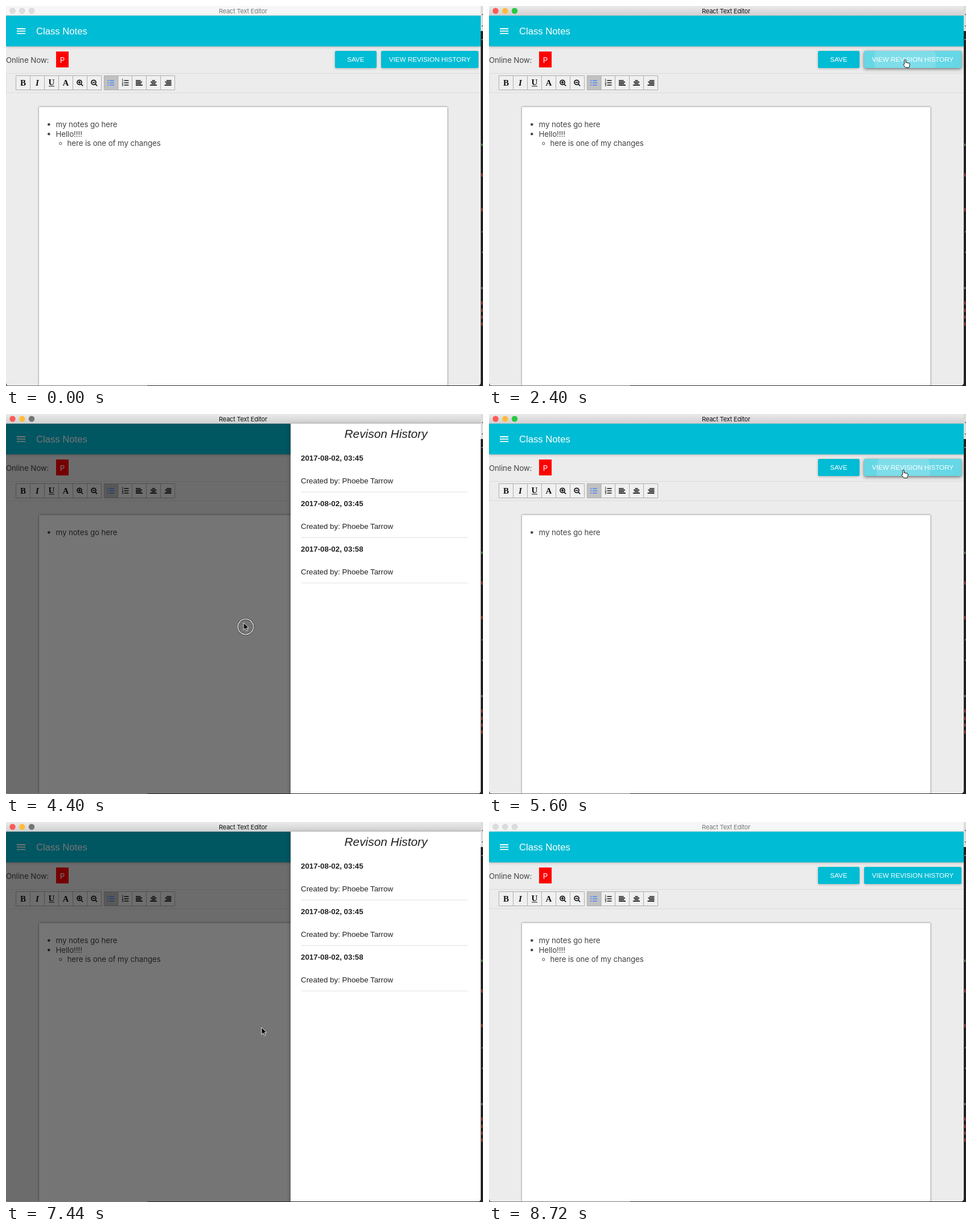
Animation, 838 px wide and 668 px high, one loop 8800 ms. Source, as an HTML page:

```html
<!DOCTYPE html>
<html lang="en">
<head>
<meta charset="utf-8">
<title>React Text Editor</title>
<style>
  html, body { margin: 0; width: 100%; height: 100%; overflow: hidden; background: #222; }
  svg { display: block; }
  text { white-space: pre; }
  .ui { font: 13.33px Inter, sans-serif; letter-spacing: -.1px; fill: #444; }
  .title { font: 11px Inter, sans-serif; letter-spacing: -.2px; text-anchor: middle; }
  .arial { font-family: "Liberation Sans", Arial, sans-serif; }
  .btn { font-size: 11.67px; fill: #fff; text-anchor: middle; }
  .tool { font: bold 15px "Liberation Serif", serif; text-anchor: middle; fill: #111; }
  .digits { font: bold 4.6px "Liberation Sans", sans-serif; fill: #111; }
  .row { font-size: 13.33px; fill: #212121; }
  .row .date { font-weight: bold; }
  .raised { filter: drop-shadow(0 1px 2px rgba(0,0,0,.25)); }
  .raised-more { filter: drop-shadow(0 2px 3px rgba(0,0,0,.4)); }
  .sheet { filter: drop-shadow(0 0 1.5px rgba(0,0,0,.6)); }
  .panel { filter: drop-shadow(0 3px 5px rgba(0,0,0,.3)); }

  /* One loop is 8800 ms, so 1% is 88 ms. */
  .loop { animation: 8800ms linear infinite; }
  .step { animation: 8800ms step-end infinite; }
  #active { animation-name: active; }
  #zoom { animation-name: zoom; }
  #more { animation-name: more; }
  #hover { animation-name: hover; }
  #ripple { animation-name: ripple; }
  #dim { animation-name: dim; }
  #drawer { animation-name: drawer; }
  #row1 { animation-name: row1; }
  #row2 { animation-name: row2; }
  #row3 { animation-name: row3; }
  #cursor { animation-name: move; }
  #arrow { animation-name: arrow; }
  #hand { animation-name: hand; }
  #ring { animation-name: ring; }

  @keyframes active { 0%, 99% { opacity: 0 } 17.2% { opacity: 1 } }
  @keyframes zoom { 0%, 52.7%, 87.2% { fill: #28c940 } 29%, 65.4% { fill: #747474 } }
  @keyframes more { 0%, 73.6% { opacity: 1 } 40.8% { opacity: 0 } }
  @keyframes hover {
    0%, 18%, 32%, 60.8%, 67%, 100% { opacity: 0 }
    21.8%, 31%, 62.6%, 66.3% { opacity: 1 }
  }
  @keyframes ripple {
    0%, 26.3% { transform: translate(731px, 95px) scale(0); opacity: 1 }
    27.27% { transform: translate(731px, 95px) scale(.54); opacity: 1 }
    28.5% { transform: translate(731px, 95px) scale(1); opacity: 1 }
    32% { transform: translate(731px, 95px) scale(1); opacity: 0 }
    33%, 62.7% { transform: translate(728px, 98px) scale(0); opacity: 1 }
    63.64% { transform: translate(728px, 98px) scale(.47); opacity: 1 }
    64.8% { transform: translate(728px, 98px) scale(1); opacity: 1 }
    68%, 100% { transform: translate(728px, 98px) scale(1); opacity: 0 }
  }
  @keyframes dim {
    0%, 27.7%, 54.5%, 63.9%, 88.1%, 100% { opacity: 0 }
    31.4%, 50.9%, 66.3%, 85.4% { opacity: 1 }
  }
  @keyframes drawer {
    0%, 54.5%, 88.1%, 100% { transform: translate(350px) }
    27.7%, 50.9%, 63.9%, 85.4% { animation-timing-function: cubic-bezier(.23, 1, .32, 1) }
    27.7%, 63.9% { transform: translate(350px) }
    31.4%, 50.9%, 66.3%, 85.4% { transform: none }
  }
  @keyframes row1 { 0%, 46%, 68.6% { opacity: 0 } 37.8%, 65.8% { opacity: 1 } }
  @keyframes row2 { 0%, 37.8%, 70.4% { opacity: 0 } 35.4%, 68.6% { opacity: 1 } }
  @keyframes row3 { 0%, 35.4%, 79% { opacity: 0 } 31.8%, 70.4% { opacity: 1 } }
  @keyframes move {
    0%, 3.6% { transform: translate(536px, 577px) }
    5.45%, 7.27% { transform: translate(621px, 488px) }
    10%, 10.91% { transform: translate(721px, 215px) }
    13.64% { transform: translate(768px, 104px) }
    15.45%, 16.4% { transform: translate(772px, 82px) }
    21.82%, 22.7% { transform: translate(735px, 98px) }
    25.45%, 29.1% { transform: translate(731px, 95px) }
    32.73% { transform: translate(692.5px, 242px) }
    33.64% { transform: translate(690px, 246px) }
    40%, 44.54% { transform: translate(610px, 100px) }
    49.1%, 55.45% { transform: translate(417.5px, 367px) }
    61.82%, 66.36% { transform: translate(728px, 99px) }
    71.82%, 77.27% { transform: translate(650px, 252px) }
    83.64%, 86.36% { transform: translate(449px, 361px) }
    88.18% { transform: translate(426px, 408px) }
    90.91%, 91.82% { transform: translate(374px, 609px) }
    96.36%, 100% { transform: translate(390px, 672px) }
  }
  @keyframes arrow {
    0%, 18%, 60.8%, 96.3% { opacity: 0 }
    3.6%, 47.2%, 81% { opacity: 1 }
  }
  @keyframes hand { 0%, 47.2%, 81% { opacity: 0 } 18%, 60.8% { opacity: 1 } }
  @keyframes ring {
    0%, 18.6%, 26.8%, 41.4%, 50.6%, 63.2%, 74.2%, 86.1% { opacity: 0 }
    17.2%, 25.8%, 40.4%, 49.5%, 62.3%, 73.2%, 85.2% { opacity: 1 }
  }
</style>
</head>
<body>
<svg width="838" height="668" viewBox="0 0 838 668">
  <defs>
    <linearGradient id="bar" x2="0" y2="1">
      <stop stop-color="#eaeaea"/><stop offset="1" stop-color="#d0d0d0"/>
    </linearGradient>
    <clipPath id="win"><path d="M0 0H834V662Q834 667 829 667H5Q0 667 0 662Z"/></clipPath>
    <clipPath id="view"><rect x="659" y="79" width="171" height="30" rx="2"/></clipPath>
  </defs>

  <!-- desktop behind the window -->
  <rect width="838" height="668" fill="#222"/>
  <rect x="833" width="5" height="44" fill="#dcdcdc"/>
  <rect y="666" width="248" height="2" fill="#777"/>
  <path d="M836 15h2M836 35h2M835 59h3M836 397h2M836 433h2" stroke="#777" stroke-width="2"/>
  <path d="M835 297h2M835 358h2M835 522h2M835 535h2M835 547h2M835 559h2" stroke="#b5433d" stroke-width="6"/>
  <path d="M835 244h2M835 496h2" stroke="#5f9a55" stroke-width="4"/>

  <g clip-path="url(#win)">
    <rect width="834" height="668" fill="#ececec"/>
    <rect y="17" width="834" height="54" fill="#00bcd4" class="raised"/>

    <!-- title bar -->
    <rect width="834" height="17" fill="#f6f6f6"/>
    <g fill="#dcdcdc" stroke="#cfcfcf" stroke-width=".6">
      <circle cx="11.5" cy="8.5" r="5"/><circle cx="28.3" cy="8.5" r="5"/><circle cx="45" cy="8.5" r="5"/>
    </g>
    <text class="title" x="416.5" y="12.5" fill="#777">React Text Editor</text>
    <g id="active" class="step">
      <rect width="834" height="17" fill="url(#bar)"/>
      <circle cx="11.5" cy="8.5" r="5.2" fill="#fc5b57"/>
      <circle cx="28.3" cy="8.5" r="5.2" fill="#fdbc40"/>
      <circle id="zoom" class="step" cx="45" cy="8.5" r="5.2" fill="#28c940"/>
      <text class="title" x="416.5" y="12.5" fill="#111">React Text Editor</text>
    </g>

    <!-- app bar -->
    <path d="M19 40h15.2M19 44.2h15.2M19 48.4h15.2" stroke="#fff" stroke-width="1.8"/>
    <text class="arial" x="53" y="49.5" font-size="16.67" fill="#fff">Class Notes</text>

    <!-- status row -->
    <text class="ui" x="0" y="99.5">Online Now:</text>
    <rect x="88" y="80" width="22" height="28" fill="#f00"/>
    <text class="ui" x="99" y="99.5" text-anchor="middle" style="fill:#fff">P</text>
    <g class="arial btn">
      <rect class="raised" x="578" y="79" width="73" height="30" rx="2" fill="#00bcd4"/>
      <text x="614.3" y="98">SAVE</text>
      <rect class="raised" x="659" y="79" width="171" height="30" rx="2" fill="#00bcd4"/>
      <g id="hover" class="loop">
        <rect class="raised-more" x="659" y="79" width="171" height="30" rx="2" fill="#66d7e5"/>
      </g>
      <g clip-path="url(#view)">
        <circle id="ripple" class="loop" r="100" fill="#fff" fill-opacity=".16"/>
      </g>
      <text x="744.5" y="98">VIEW REVISION HISTORY</text>
    </g>

    <!-- toolbar -->
    <rect x=".5" y="118.5" width="840" height="34" fill="none" stroke="#dcdcdc"/>
    <path d="M17.5 122.5h150v25h-150zM172.5 122.5h124v25h-124z" fill="#f0f0f0"/>
    <rect x="172" y="122.5" width="25" height="25" fill="#c1c1c1"/>
    <path d="M17.5 122.5h150v25h-150zM42.5 122.5v25M67.5 122.5v25M92.5 122.5v25M117.5 122.5v25M142.5 122.5v25
             M172.5 122.5h124v25h-124zM197 122.5v25M221.5 122.5v25M246.5 122.5v25M271.5 122.5v25" fill="none" stroke="#adadad"/>
    <g class="tool">
      <text x="30" y="140">B</text>
      <text x="55" y="140" font-style="italic">I</text>
      <text x="80" y="139">U</text>
      <text x="105" y="140">A</text>
    </g>
    <g fill="none" stroke="#111" stroke-width="1.7">
      <path d="M75 141h10" stroke-width="1"/>
      <g id="lens"><circle cx="129" cy="134.3" r="4"/><path d="M132 137.3l3.2 3.2M126.8 134.3h4.4"/></g>
      <use href="#lens" x="25"/>
      <path d="M129 132.1v4.4"/>
      <path d="M182 131h8M182 135h8M182 139h8M178 131h2.4M178 135h2.4M178 139h2.4" stroke="#4a86f7"/>
      <path d="M207.5 131h8M207.5 135h8M207.5 139h8"/>
      <path d="M228 131h8.6M228 133.7h11.1M228 136.4h9.4M228 139.1h12"/>
      <path d="M256.5 131h5.2M254 133.7h10.2M255.6 136.4h7M253 139.1h12"/>
      <path d="M281.9 131h8.6M279.4 133.7h11.1M281.1 136.4h9.4M278.5 139.1h12"/>
    </g>
    <g class="digits"><text x="203.5" y="132.3">1</text><text x="203.5" y="136.6">2</text><text x="203.5" y="141">3</text></g>

    <!-- document -->
    <rect class="sheet" x="58" y="177.5" width="717.5" height="500" fill="#fff"/>
    <g class="ui">
      <circle cx="75.3" cy="208.3" r="2.3"/>
      <text x="87.5" y="213">my notes go here</text>
      <g id="more" class="step">
        <circle cx="75.3" cy="225" r="2.3"/>
        <text x="87.5" y="229.5">Hello!!!!</text>
        <circle cx="95.7" cy="241.6" r="2.2" fill="none" stroke="#444" stroke-width=".9"/>
        <text x="107.5" y="246">here is one of my changes</text>
      </g>
    </g>

    <!-- revision drawer -->
    <rect id="dim" class="loop" y="17" width="834" height="651" fill="#000" fill-opacity=".54"/>
    <g id="drawer" class="loop">
      <rect class="panel" x="500" y="17" width="334" height="651" fill="#fff"/>
      <g fill="#f5f5f5">
        <rect id="row1" class="step" x="505" y="58" width="321" height="79"/>
        <rect id="row2" class="step" x="505" y="138" width="321" height="79"/>
        <rect id="row3" class="step" x="505" y="218" width="321" height="79"/>
      </g>
      <text class="arial" x="667.5" y="42" font-size="20.83" font-style="italic" text-anchor="middle" fill="#212121">Revison History</text>
      <g class="arial row">
        <text class="date" x="518" y="82">2017-08-02, 03:45</text>
        <text class="date" x="518" y="162">2017-08-02, 03:45</text>
        <text class="date" x="518" y="242">2017-08-02, 03:58</text>
        <g id="author">
          <text x="518" y="122">Created by: Phoebe Tarrow</text>
          <path d="M518 137h294" stroke="#e0e0e0"/>
        </g>
        <use href="#author" y="80"/>
        <use href="#author" y="160"/>
      </g>
    </g>
    <rect id="edge" x="0" y="16.5" width="834" height=".5" fill="#b8b8b8"/>
  </g>

  <g id="cursor" class="loop">
    <g id="ring" class="step" fill="none">
      <circle cx="3.5" cy="7" r="13.6" stroke="#333" stroke-width="3"/>
      <circle cx="3.5" cy="7" r="13.6" stroke="#fff" stroke-width="1.4"/>
    </g>
    <path id="arrow" class="step" d="M0 0V12.5L2.9 9.8 4.9 14.3 6.9 13.4 5 9.1H8.9Z" fill="#000" stroke="#fff" stroke-width=".9"/>
    <path id="hand" class="step" d="M-1.3 7.5V.8a1.3 1.3 0 0 1 2.6 0V5a1.2 1.2 0 0 1 2.4.4a1.2 1.2 0 0 1 2.3.5a1.1 1.1 0 0 1 2 .8V9.5L6.8 13.5H1L-3.2 8.4a1.2 1.2 0 0 1 1.9-.9Z" fill="#fff" stroke="#111"/>
  </g>
</svg>
</body>
</html>
```
